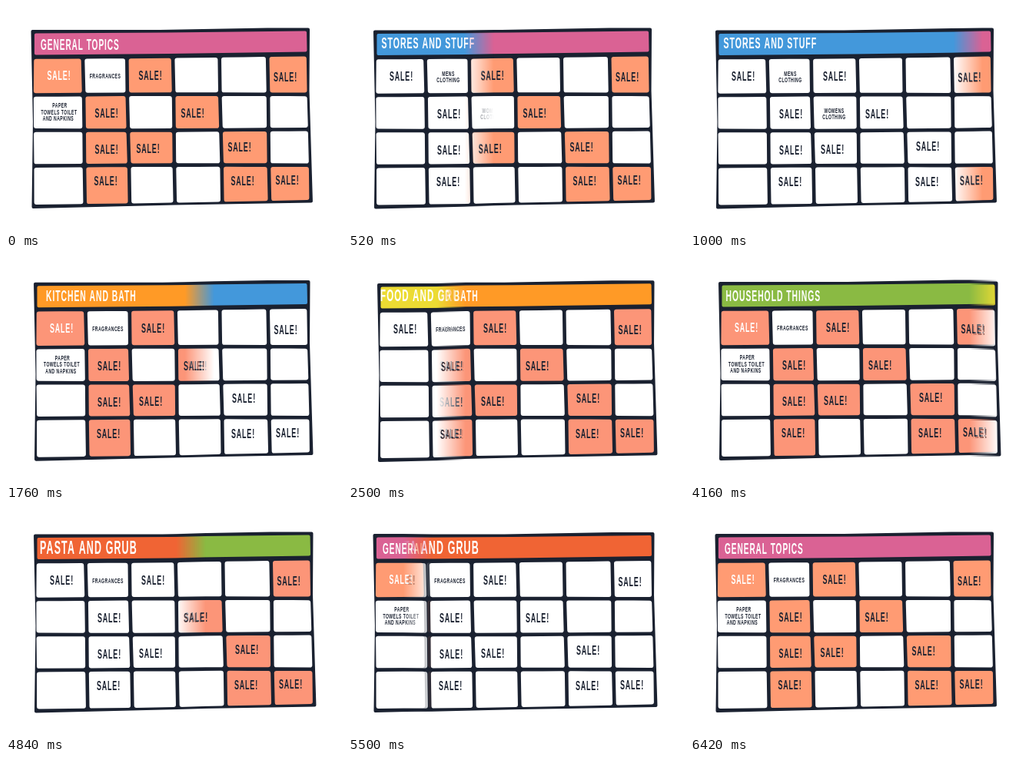
Write an HTML page with a canvas that moves like this. It is 437 px wide and 291 px high and loops after 6440 ms.

```html
<!DOCTYPE html>
<html lang="en">
<head>
<meta charset="utf-8">
<title>Sale board</title>
<style>
html, body { margin: 0; width: 100%; height: 100%; overflow: hidden; background: #fff; }
canvas { display: block; }
</style>
</head>
<body>
<canvas id="stage" width="437" height="291"></canvas>
<script>
const W = 437, H = 291, LOOP = 6440;
const START = 122, WIPE = 1036, FROM = 12, TO = 424, SOFT = 19;
const INK = '#1a2130', CONDENSE = 0.52, SPACING = 0.09;

const columns = [34, 101.5, 159, 218.5, 279.5, 341.5, 395];
const rows = [66.5, 115.5, 161.5, 207.5, 260.5];

// [row, column, x, y] of every sale label
const sales = [
  [0, 0, 69, 90], [0, 2, 188, 90], [0, 5, 363.5, 92],
  [1, 1, 131, 139], [1, 3, 243, 139],
  [2, 1, 131, 186], [2, 2, 185, 185], [2, 4, 309, 181],
  [3, 1, 130, 227], [3, 4, 308, 227], [3, 5, 366, 226]
];

const fragrances = [['FRAGRANCES', 129, 90.5]];
const household = [
  ...fragrances,
  ['PAPER', 70, 128.5], ['TOWELS TOILET', 69, 137], ['AND NAPKINS', 68, 145.5]
];
const clothing = [
  ['MENS', 130, 86.5], ['CLOTHING', 130, 94.5],
  ['WOMENS', 187, 134.5], ['CLOTHING', 187, 142.5]
];

const slides = [
  { title: 'GENERAL TOPICS', x: 45, y: 50, size: 19.5, color: '#da6294', cell: '#ff9b73',
    dx: 0, dy: 0, labels: household, nudge: [-5, 2] },
  { title: 'STORES AND STUFF', x: 43, y: 47.5, size: 20.4, color: '#4398db',
    dx: 0.5, dy: 0.5, labels: clothing },
  { title: 'KITCHEN AND BATH', x: 48.5, y: 48.5, size: 20, color: '#ff9a26', cell: '#fc9578',
    dx: 3.5, dy: 0.7, labels: household },
  { title: 'FOOD AND GRUB', x: 36.5, y: 45.5, size: 22.4, color: '#ecdb33',
    dx: 5.5, dy: 2, labels: fragrances, skip: '2,1' },
  { title: 'HOUSEHOLD THINGS', x: 42, y: 49, size: 20, color: '#8aba43', cell: '#fc9578',
    dx: 4.5, dy: 0, labels: household },
  { title: 'PASTA AND GRUB', x: 40.5, y: 47.5, size: 24, color: '#f06434',
    dx: 3.5, dy: 0.5, labels: fragrances }
];

function newCanvas() {
  const c = document.createElement('canvas');
  c.width = W;
  c.height = H;
  return c;
}

function polygon(g, points, color, radius = 3) {
  g.beginPath();
  const [a, b] = points;
  g.moveTo((a[0] + b[0]) / 2, (a[1] + b[1]) / 2);
  for (let i = 1; i <= points.length; i++) {
    const p = points[i % points.length], q = points[(i + 1) % points.length];
    g.arcTo(p[0], p[1], q[0], q[1], radius);
  }
  g.closePath();
  g.fillStyle = color;
  g.fill();
}

function write(g, text, x, y, size, color, align = 'center') {
  g.save();
  g.translate(x, y + size * 0.36);
  g.scale(CONDENSE, 1);
  g.font = `bold ${size}px "Liberation Sans", Arial, sans-serif`;
  g.letterSpacing = `${size * SPACING}px`;
  g.textAlign = align;
  g.fillStyle = color;
  g.fillText(text, 0, 0);
  g.restore();
}

// Slightly uneven crossing of two hand-drawn grid lines
function crossing(r, c) {
  const along = (columns[c] - 34) / 361;
  const slope = [-3, -1, -1, -1, -6][r];
  const lean = c ? 0.8 * (r - 2) : 0;
  return [
    columns[c] + lean + 0.4 * Math.sin(r * 5 + c * 3),
    rows[r] + slope * along + 0.4 * Math.sin(r * 3 + c * 7)
  ];
}

function render(s) {
  const c = newCanvas(), g = c.getContext('2d');
  g.fillStyle = '#fff';
  g.fillRect(0, 0, W, H);
  g.translate(s.dx, s.dy);
  polygon(g, [[32.5, 31], [200, 31], [340, 28.5], [395, 28.5], [394.5, 110], [399, 255.5], [220, 258.5], [33.5, 263], [35, 150]], INK, 2);
  polygon(g, [[37, 35.5], [210, 34.5], [391, 32.5], [391.5, 59.5], [210, 62], [37, 63.5]], s.color, 2);

  const gap = 2.3;
  for (let r = 0; r < 4; r++) {
    for (let col = 0; col < 6; col++) {
      const [a, b, d, e] = [crossing(r, col), crossing(r, col + 1), crossing(r + 1, col + 1), crossing(r + 1, col)];
      const sold = s.cell && sales.some(k => k[0] === r && k[1] === col);
      polygon(g, [
        [a[0] + gap, a[1] + gap], [b[0] - gap, b[1] + gap],
        [d[0] - gap, d[1] - gap], [e[0] + gap, e[1] - gap]
      ], sold ? s.cell : '#fff');
    }
  }

  write(g, s.title, s.x, s.y, s.size, '#fff', 'left');
  for (const [r, col, x, y] of sales) {
    if (s.skip === `${r},${col}`) continue;
    const [nx, ny] = s.nudge && r === 2 && col === 4 ? s.nudge : [0, 0];
    write(g, 'SALE!', x + nx, y + ny, 17.2, s.cell && !r && !col ? '#fff' : INK);
  }
  for (const [text, x, y] of s.labels) write(g, text, x, y, 9.8, INK);
  return c;
}

const boards = slides.map(render);
const ctx = document.getElementById('stage').getContext('2d');
const layer = newCanvas(), mask = layer.getContext('2d');

function draw(now) {
  const turn = Math.min(Math.max((now % LOOP - START) / WIPE, 0), 6);
  const i = Math.floor(turn), x = FROM + (turn - i) * (TO - FROM);
  ctx.drawImage(boards[i % 6], 0, 0);

  mask.globalCompositeOperation = 'copy';
  mask.drawImage(boards[(i + 1) % 6], 0, 0);
  mask.globalCompositeOperation = 'destination-in';
  const fade = mask.createLinearGradient(x - SOFT, 0, x + SOFT, 0);
  fade.addColorStop(0, '#000');
  fade.addColorStop(1, 'transparent');
  mask.fillStyle = fade;
  mask.fillRect(0, 0, W, H);
  ctx.drawImage(layer, 0, 0);
}

const begin = performance.now();
function tick() {
  draw(performance.now() - begin);
  requestAnimationFrame(tick);
}
tick();
</script>
</body>
</html>
```
